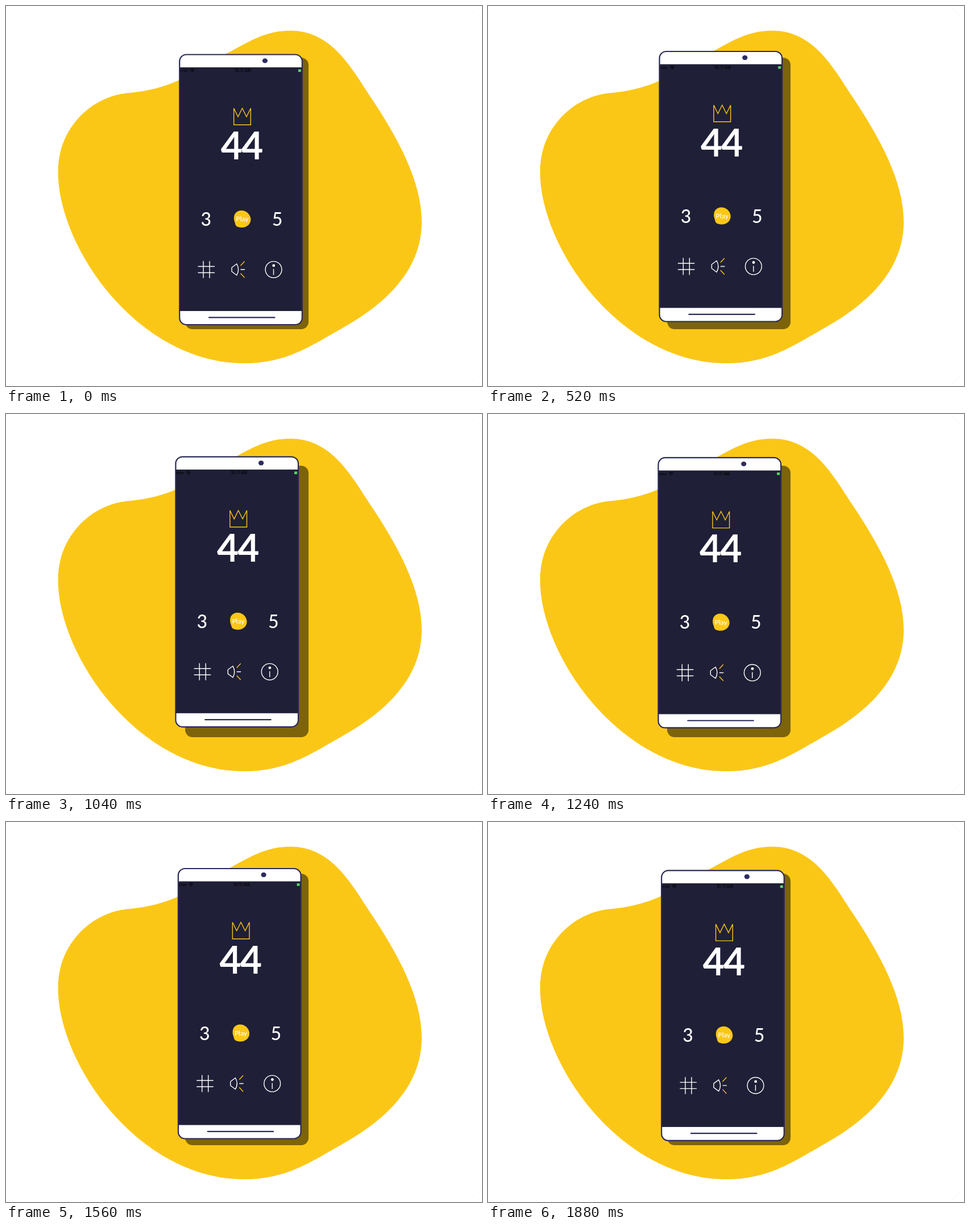
An HTML page that plays this animation: 837x669 px, repeating every 1.92 s.

```html
<!DOCTYPE html>
<html lang="en">
<head>
<meta charset="utf-8">
<title>Floating phone</title>
<style>
  html, body { margin: 0; width: 100%; height: 100%; overflow: hidden; background: #fff; }
  svg { display: block; width: 837px; height: 669px; }
  text { font-family: Lato, "Open Sans", sans-serif; fill: #fff; text-anchor: middle; }
  .line { fill: none; stroke: #fff; stroke-width: 1.4; }
  .gold { stroke: #fbc717; }
  .status { font: 600 7px Inter, Roboto, sans-serif; fill: #07070d; }
</style>
</head>
<body>
<svg viewBox="0 0 837 669">
  <path fill="none" stroke="#f7f7f7" d="M0 26L26 0M811 0L837 24M0 643L26 669M811 669L837 645"/>
  <path fill="#fbc717" d="M495 43.5
    C572 41 606 107 643 163
    C690 234 731 310 731 380
    C731 470 660 527 600 562
    C543 594 497 629 420 629
    C232 629 91.5 425 91.5 292
    C91.5 215 150 158 217 153
    C305 145 345 105 395 80
    C425 64 455 44.5 495 43.5Z"/>
  <rect x="315" y="91" width="217" height="478" rx="13" fill="#7d640a"/>

  <g id="phone">
    <rect x="305.2" y="85.5" width="215.6" height="475.5" rx="12" fill="#fff"/>
    <rect x="305.2" y="108" width="215.6" height="429" fill="#1f1f37"/>
    <rect x="305.2" y="85.5" width="215.6" height="475.5" rx="12" fill="none" stroke="#2a2a57" stroke-width="2.2"/>
    <ellipse cx="455.4" cy="96.4" rx="4.6" ry="4.2" fill="#2d2b60"/>
    <path d="M357 548.3H472.5" stroke="#2a2a57" stroke-width="2.2" stroke-linecap="round"/>

    <text class="status" x="313" y="116.3">rrier</text>
    <g fill="none" stroke="#07070d" stroke-width="1.3">
      <path d="M323.6 113Q327.6 109.2 331.6 113M325.3 114.8Q327.6 112.6 329.9 114.8"/>
      <circle cx="327.6" cy="116" r=".4"/>
    </g>
    <text class="status" x="416.5" y="116.5">10:11 AM</text>
    <rect x="513.8" y="111.5" width="5" height="4.6" rx=".6" fill="#4fd865"/>

    <path class="line gold" d="M400.6 209.2V180L408 195L415.4 180L422.9 195L430.3 180V209.2Z"/>
    <text x="414" y="270" font-size="66" font-weight="700" letter-spacing="-2">44</text>

    <text x="351.7" y="387" font-size="32" font-weight="500">3</text>
    <text x="477" y="387" font-size="32" font-weight="500">5</text>
    <path fill="#fbc717" d="M413 360
      C422 359.5 429 366 430.3 374
      C431.5 383 424 390 415 390
      C408 390 403.5 388 403 383
      C402 379 400 376 401.2 370
      C402.5 364 407 360.5 413 360Z"/>
    <text x="415.3" y="379.3" font-size="12" font-weight="500">Play</text>

    <path class="line" d="M347 449V479M358 449V479M337.5 458.5H367M337.5 469.5H367"/>
    <path class="line" d="M397 460.5L405.7 454Q411.5 464 405.7 474L397 467.5ZM412.5 464H420"/>
    <path class="line gold" d="M412.5 457L419.5 449.5M412.5 470.7L419.5 478.3"/>
    <circle class="line" cx="470.5" cy="464" r="14.4"/>
    <path class="line" d="M470.5 463V473.5"/>
    <circle cx="470.7" cy="457" r="2.4" fill="#fff"/>
  </g>
</svg>
<script>
  const LOOP = 1920, STEP = 40, START = 20;
  const phone = document.getElementById('phone');

  function draw() {
    const time = Math.floor(performance.now() % LOOP / STEP) * STEP;
    const lift = (1 - Math.cos((time - START) / LOOP * 2 * Math.PI)) / 2;
    phone.setAttribute('transform', `translate(${-6.9 * lift} ${-10.3 * lift})`);
    requestAnimationFrame(draw);
  }
  draw();
</script>
</body>
</html>
```
